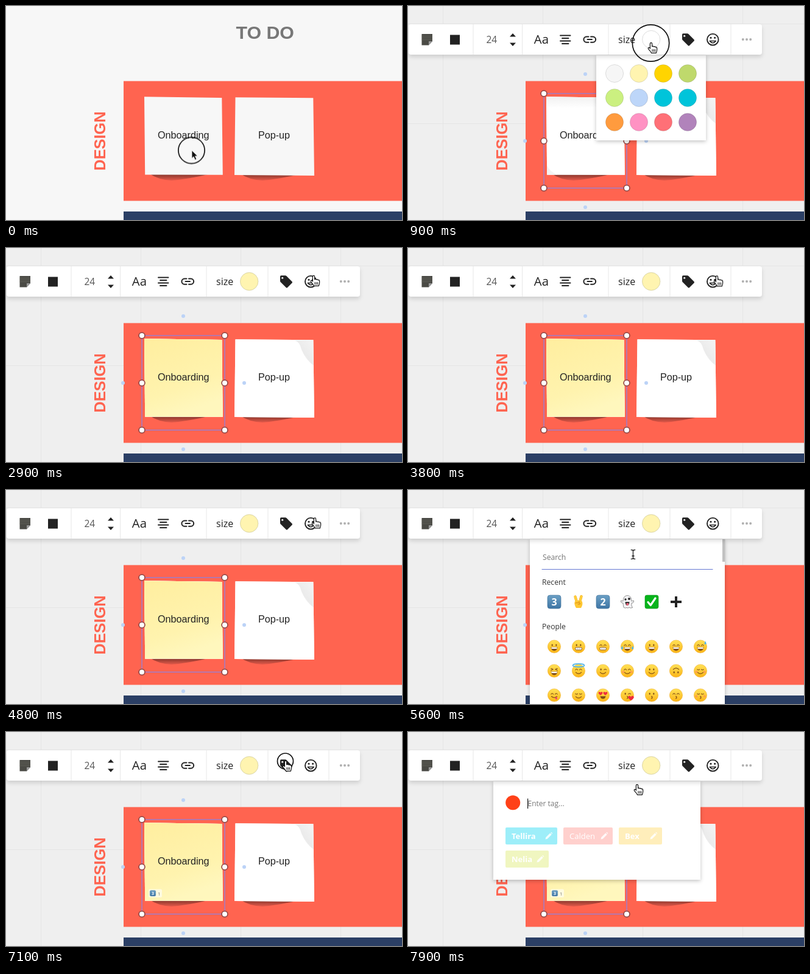
Recreate the animation shown at these times as an HTML page. Size 650 by 352 pixels, loop 8 s.

```html
<!DOCTYPE html>
<html lang="en">
<head>
<meta charset="utf-8">
<title>Task board</title>
<style>
html, body { margin: 0; width: 100%; height: 100%; overflow: hidden; background: #f7f7f7; }
svg { display: block; width: 650px; height: 352px; }
text { font-family: "Open Sans", sans-serif; }
.board { font-family: "Liberation Sans", Arial, sans-serif; }
.line { fill: none; stroke-linecap: round; stroke-linejoin: round; }
.drop { filter: drop-shadow(0 2px 3px rgba(0, 0, 0, .24)); }
.bar { filter: drop-shadow(0 4px 3px rgba(0, 0, 0, .13)); }
</style>
</head>
<body>
<svg id="stage" viewBox="0 0 650 352" xmlns="http://www.w3.org/2000/svg"></svg>
<script>
const LOOP = 8000, STEP = 100;
const INK = '#222', RED = '#ff6450', PALE = '#fff4b0';

const rect = (x, y, w, h, fill, more = '') => `<rect x="${x}" y="${y}" width="${w}" height="${h}" fill="${fill}" ${more}/>`;
const disc = (x, y, r, fill, more = '') => `<circle cx="${x}" cy="${y}" r="${r}" fill="${fill}" ${more}/>`;
const shape = (d, fill, more = '') => `<path d="${d}" fill="${fill}" ${more}/>`;
const line = (d, color, w = 1, more = '') => `<path class="line" d="${d}" stroke="${color}" stroke-width="${w}" ${more}/>`;
const text = (x, y, size, fill, str, more = '') => `<text x="${x}" y="${y}" font-size="${size}" fill="${fill}" ${more}>${str}</text>`;
const layer = (id, body) => `<g id="${id}">${body}</g>`;
const at = (x, y, body, k = 1) => `<g transform="translate(${x} ${y}) scale(${k})">${body}</g>`;

const defs = `<defs>
  <linearGradient id="yellow" x1="0" y1="0" x2=".35" y2="1"><stop stop-color="#ffee9f"/><stop offset=".7" stop-color="#fff3ae"/><stop offset="1" stop-color="#fff7bd"/></linearGradient>
  <linearGradient id="shade" x1="0" y1="0" x2="0" y2="1"><stop stop-color="#7f342a"/><stop offset="1" stop-color="#e4594a"/></linearGradient>
  <linearGradient id="peel" x1="1" y1="0" x2="0" y2="1"><stop stop-color="#f4f4f4"/><stop offset=".5" stop-color="#ebebeb"/><stop offset="1" stop-color="#fff"/></linearGradient>
  <linearGradient id="top" x1="0" y1="0" x2="0" y2="1"><stop stop-color="#f1f1f1"/><stop offset="1" stop-color="#fff"/></linearGradient>
  <linearGradient id="skin" x1="0" y1="0" x2="0" y2="1"><stop stop-color="#ffe257"/><stop offset="1" stop-color="#fbb416"/></linearGradient>
  <linearGradient id="key" x1="0" y1="0" x2="0" y2="1"><stop stop-color="#6b9fc4"/><stop offset="1" stop-color="#3f76a5"/></linearGradient>
</defs>`;

// Board
const grid = [57.5, 221.5, 385.5, 549.5].map(x => `M${x} 0V352`).join('') + 'M0 29.5H650M0 193.5H650';
const noteA = 'M227 149.3L354.3 151L355.8 277.8L228.2 277.5Z';
const noteB = 'M376.5 150.3L504.3 151.2L506 279L375 278Z';
const shadow = x => shape(`M${x} 276H${x + 100}Q${x + 62} 285 ${x + 36} 287Q${x + 14} 286 ${x} 276Z`, 'url(#shade)');
const board =
  text(377.5, 54, 30.3, '#777', 'TO DO', 'class="board" font-weight="700"') +
  rect(193, 123.5, 457, 197, RED) + rect(193, 338, 457, 14, '#2b3f65') +
  `<text class="board" transform="translate(162.8 222) rotate(-90)" text-anchor="middle" font-size="25.4" font-weight="700" fill="${RED}">DESIGN</text>` +
  shadow(236) + shadow(385);
const label = (x, str) => text(x, 217.6, 16.2, INK, str, 'class="board" text-anchor="middle"');

const whiteNotes =
  shape(noteA, '#fff') + shape('M227 149.3L354.3 151V160Q290 172 227.3 166Z', 'url(#top)') +
  shape('M228 262Q232 272 245 277.5H228.2Z', '#f3f3f3') +
  shape(noteB, '#fff') + shape('M474 152Q482 154 485 167Q492 184 504.7 193L504.3 151.2Z', 'url(#peel)');

const frameBox =
  rect(223, 144, 136, 155.5, 'none', 'stroke="#9080dc" stroke-width="1.3"') +
  [144, 222, 299.5].flatMap(y => [223, 359].map(x => disc(x, y, 4.9, '#fff', 'stroke="#964846" stroke-width="1.7"'))).join('') +
  [[291, 112], [192, 222], [391, 222], [291, 331]].map(([x, y]) => disc(x, y, 3, '#bcd3f7')).join('');

// Toolbar
const swatch = (x, y, c, edge = 'rgba(0,0,0,.12)') => disc(x, y, 14.6, c, `stroke="${edge}"`);
const toolbar =
  rect(1, 30, 580, 50, '#fff', 'rx="4" class="bar"') +
  line([107, 187.5, 329, 430, 530].map(x => `M${x} 30.5V79.5`).join(''), '#e7e7e7') +
  shape('M22.5 46H40V58L34 64.5H22.5Z', '#4a4a45') + line('M23 49.5H39.5M23 52.5H39.5M23 55.5H39.5', '#5f5f57') +
  shape('M34 64.5V58H40Z', '#999') +
  rect(69, 47.5, 16, 16, INK) +
  text(128.5, 60.5, 15.5, '#555', '24') +
  shape('M167 50.5L172 45L177 50.5ZM167 60.5L172 66L177 60.5Z', INK) +
  text(206.8, 62, 20.3, INK, 'Aa', 'font-weight="500"') +
  line('M250 48.5H266.5M253 53H263.5M250 57.5H266.5M253 62H263.5', INK, 1.9) +
  line('M296.5 50.5H293A4.6 4.6 0 0 0 293 59.7H296.5M300 50.5H303.5A4.6 4.6 0 0 1 303.5 59.7H300M294.5 55.1H302', INK, 2) +
  text(345, 61, 16, INK, 'size') +
  shape('M450 47Q450 45.3 451.7 45.3H458.5Q459.5 45.3 460.3 46L469.5 55.3Q470.6 56.5 469.5 57.6L462 65Q460.8 66 459.7 65L450.7 56Q450 55.2 450 54.3Z', INK) +
  disc(453.7, 49.2, 1.5, '#fff') +
  disc(500.3, 55.2, 9.3, 'none', `stroke="${INK}" stroke-width="1.9"`) +
  disc(497, 52.3, 1.5, INK) + disc(503.6, 52.3, 1.5, INK) + line('M495.3 57.5Q500.3 64 505.3 57.5Z', INK, 1.6) +
  [549.8, 556, 562.2].map(x => disc(x, 55, 2, '#b0b0b0')).join('') +
  swatch(399.2, 55, '#fff', '#ddd') + layer('chosen', swatch(399.2, 55, PALE, '#e0d9a4'));

// Colour palette
const colors = ['#f6f6f6', PALE, '#ffd400', '#bfd96c', '#cbf080', '#bdd6f9', '#00c4da', '#00c4da', '#ff9b3e', '#ff92c3', '#ff7077', '#b183bb'];
const palette = rect(309, 81, 180, 140, '#fff', 'class="drop"') +
  colors.map((c, i) => swatch(339 + i % 4 * 40, 111 + (i >> 2) * 40, c)).join('');

// Emoji, drawn around 0,0
const DARK = '#7a4a17';
const heart = (x, y, k) => at(x, y, shape('M0 3.2Q-6-1-3-3Q-1-4 0-1.6Q1-4 3-3Q6-1 0 3.2Z', '#ee2c3e'), k);
const both = f => f(-3.6) + f(3.6);
const eyes = {
  dot: both(x => `<ellipse cx="${x}" cy="-2.6" rx="1.2" ry="1.8" fill="${DARK}"/>`),
  arc: both(x => line(`M${x - 2}-1.6Q${x}-5 ${x + 2}-1.6`, DARK, 1.2)),
  shut: both(x => line(`M${x - 2}-2.6Q${x}-.6 ${x + 2}-2.6`, DARK, 1.2)),
  squint: line('M-5.6-4.4L-2-2.6L-5.6-1M5.6-4.4L2-2.6L5.6-1', DARK, 1.2),
  wink: `<ellipse cx="-3.6" cy="-2.6" rx="1.2" ry="1.8" fill="${DARK}"/>` + line('M2-2Q4-4 6-2', DARK, 1.2),
  heart: both(x => heart(x * 1.2, -2.8, .95))
};
const mouths = {
  open: shape('M-6 1.2H6Q5 7.6 0 7.6T-6 1.2Z', DARK) + rect(-5, 1.4, 10, 2.6, '#fff'),
  teeth: rect(-6, 1.5, 12, 4.6, '#fff', `rx="2.2" stroke="${DARK}" stroke-width=".9"`) + line('M-5.5 3.8H5.5M-2 2V6M2 2V6', '#aaa', .5),
  grin: shape('M-5 2H5Q4 6.6 0 6.6T-5 2Z', DARK),
  smile: line('M-5 2.5Q0 7.6 5 2.5', DARK, 1.2),
  kiss: line('M-.6 2Q2.6 2.6.2 4Q2.6 5 -.6 6', DARK, 1.1),
  tongue: line('M-5 2.2Q0 6.5 5 2.2', DARK, 1.2) + shape('M1 4.6Q3 9 5.2 7Q6 5 4.2 3Z', '#f0476d')
};
const blush = both(x => disc(x * 1.9, 1.8, 2, '#ff8a5c', 'opacity=".6"'));
const tear = (x, y) => shape(`M${x} ${y - 3}Q${x + 3} ${y + 2} ${x} ${y + 2.4}T${x} ${y - 3}Z`, '#4cb6ee');
const halo = '<ellipse cy="-9" rx="9.5" ry="2.6" fill="none" stroke="#53b5e8" stroke-width="1.7"/>';
const face = (e, m, extra = '', flip = 1) =>
  disc(0, 0, 10.6, 'url(#skin)', 'stroke="#eda21c" stroke-width=".5"') + at(0, 0, eyes[e] + mouths[m], .92 * flip) + extra;
const people = [
  ['dot', 'open'], ['dot', 'teeth'], ['arc', 'teeth'], ['arc', 'open', tear(-8.5, 2) + tear(8.5, 2)], ['dot', 'open'], ['arc', 'open'], ['arc', 'open', tear(8, -6)],
  ['squint', 'open'], ['arc', 'smile', halo], ['wink', 'smile'], ['arc', 'smile', blush], ['dot', 'smile'], ['dot', 'smile', '', -1], ['shut', 'smile', blush],
  ['arc', 'tongue'], ['shut', 'smile'], ['heart', 'grin'], ['wink', 'kiss', heart(6, 5, 1.2)], ['dot', 'kiss'], ['arc', 'kiss'], ['shut', 'kiss', blush]
];
const keycap = n => rect(-11, -11, 22, 22, 'url(#key)', 'rx="4" stroke="#3b6c96" stroke-width=".6"') +
  text(0, 5.8, 16, '#fff', n, 'text-anchor="middle" font-weight="700"');
const victory = line('M-3 0L-5.5-8.5M2 0L4.5-9', '#f0a81c', 4.4) + line('M-3 0L-5.5-8.5M2 0L4.5-9', '#ffcf3c', 3.4) +
  shape('M-6-1Q0-4 5.5-1Q8 3 4 10H-4Q-8 4-6-1Z', '#ffc732') + line('M-5 2Q0 0 3 3Q1 5-1 4M1-1V1.5', '#d98a14', 1);
const ghost = shape('M-6 9Q-7 4-7 2Q-11 2-10.5-2Q-9-2-7-1Q-7-10 0-10.5Q7-10 7-1Q9-2 10.5-2Q11 2 7 2Q6 6 8.5 9.5Q5 11 3 9Q1 11-1 9.5Q-4 11-6 9Z', '#f4f4f6', 'stroke="#777" stroke-width=".8"') +
  disc(-3, -4, 1.7, '#333') + disc(3, -5, 2.1, '#333') + shape('M-3.5 0H3.5Q3 6 0 6T-3.5 0Z', '#333') + shape('M-1.5 2H2V5Q0 7-1.5 5Z', '#f0637c');
const tick = rect(-11, -11, 22, 22, '#08b41c', 'rx="3" stroke="#078d17" stroke-width=".6"') + line('M-6 .5L-1.8 5.5L6-6', '#fff', 3.2);
const plus = shape('M-2-9H2V-2H9V2H2V9H-2V2H-9V-2H-2Z', INK);
const recent = [keycap(3), victory, keycap(2), ghost, tick, plus];

const emojiPanel =
  rect(200, 81, 320, 290, '#fff', 'class="drop"') + rect(516, 81, 4.5, 37, '#c1c1c1') +
  text(221, 115.3, 12.2, '#757575', 'Search') + line('M220 130.5H500', '#6477d2', 1.1) +
  layer('picked', rect(220, 164, 40, 40, '#efefef', 'rx="3"')) +
  text(220, 156, 12.2, '#333', 'Recent') + text(220, 229, 12.2, '#333', 'People') +
  recent.map((e, i) => at(240 + i * 40, 184, e)).join('') +
  people.map((p, i) => at(240 + i % 7 * 40, 257.5 + Math.floor(i / 7) * 40, face(...p))).join('') +
  layer('searchCaret', rect(221, 103, 1.2, 16, '#111'));

// Tag panel
const pencil = shape('M-5.5 5.5L-4.8 2.2L2.3-4.8L4.8-2.3L-2.2 4.8ZM3.2-5.6L4.4-6.2L6.2-4.4L5.6-3.2Z', '#fff', 'opacity=".85"');
const tag = ([x, y, w, fill, name, weight]) => rect(x, y, w, 28, fill, 'rx="2"') +
  text(x + 10, y + 18.7, 13, '#fff', name, `font-weight="${weight}"`) + at(x + w - 14, y + 14, pencil);
const tagPanel =
  rect(140, 81, 340, 162, '#fff', 'class="drop"') + disc(172.2, 116.3, 12, '#ff4118') +
  text(196.5, 122, 12, '#777', 'Enter tag...') +
  [[160, 157, 85, '#9deef9', 'Tellira', 700], [255, 157, 81, '#ffd0cd', 'Calden', 400],
   [346, 157, 71, '#ffeebb', 'Bex', 700], [160, 195, 71, '#f0f6c0', 'Nelia', 700]].map(tag).join('') +
  rect(196, 109.5, 1.2, 16.5, '#111');

// Pointer, hot spot at 0,0
const hand = shape('M-1.6 8V1.2Q-1.6-.6 0-.6T1.6 1.2V5.4Q3.2 4.4 4.6 6Q6.2 5 7.4 6.8Q9.4 6 9.6 8.4V11.5Q9.4 13.5 8.2 16.4H.6Q-.6 13.6-4.4 9.8Q-5.4 7.6-3.6 7.4Q-2.4 7.6-1.6 8.6Z', '#fff', 'stroke="#111" stroke-width="1.2"') +
  line('M2 10.5V14M4.3 10.5V14M6.6 10.5V14', '#111');
const arrow = shape('M0 0V13.2L3 10.4L5.3 15.6L7.8 14.5L5.5 9.4H9.6Z', '#111', 'stroke="#fff" stroke-width=".8"');
const beam = line('M-3-7.5Q0-7.5 0-5.5Q0-7.5 3-7.5M-3 7.5Q0 7.5 0 5.5Q0 7.5 3 7.5M0-6V6M-1.5 2.5H1.5', '#111', 1.3);
const pointer = disc(-.5, 0, 21.6, 'none', 'id="ring" stroke="#111" stroke-width="1.7"') +
  layer('arrow', arrow) + layer('hand', hand) + layer('beam', beam);

const badge = rect(234, 258.5, 22, 13.5, '#fffbe0', 'rx="2"') + at(241, 265.3, keycap(3), .43) + text(249, 268.5, 8, '#777', '1');

document.getElementById('stage').innerHTML = defs +
  rect(0, 0, 650, 352, '#f7f7f7') +
  layer('canvas', rect(0, 0, 650, 352, '#efefef') + line(grid, '#e5e5e5')) + board +
  shape(noteA + noteB, '#f7f7f7') + layer('white', whiteNotes) + layer('tinted', shape(noteA, 'url(#yellow)')) +
  label(291.3, 'Onboarding') + label(440, 'Pop-up') +
  layer('badge', badge) + layer('select', frameBox) +
  layer('palette', palette) + layer('emoji', emojiPanel) + layer('tags', tagPanel) +
  layer('toolbar', toolbar) + layer('pointer', pointer);

// Timeline: pointer stops and points passed at speed, as [ms, x, y]
const path = [
  [0, 305, 237.5], [200, 305, 237.5], [600, 399, 61], [1000, 399, 61], [1700, 384, 102], [2200, 384, 102],
  [2800, 505, 46], [2900, 505, 46], [3100, 507, 46.5], [5000, 507, 46.5],
  [5600, 369.5, 106], [5900, 240, 184], [6300, 240, 184], [6500, 318, 138], [6900, 459, 48], [7600, 459, 48],
  [7900, 376, 87], [8200, 200, 171]
];
const clicks = [-200, 600, 1900, 3100, 5900, 7000];
const shown = {
  canvas: [200], white: [200], select: [200], toolbar: [200],
  tinted: [2100], chosen: [2100], badge: [6200], picked: [5900],
  palette: [900, 2300], emoji: [5000, 6600], tags: [7500]
};
const during = (t, id) => t >= shown[id][0] && t < (shown[id][1] || LOOP);

// Zero where the pointer rests, otherwise the mean speed across the point
function speed(i, k) {
  const a = path[i - 1], p = path[i], b = path[i + 1];
  if (!a || !b || a[k] === p[k] || b[k] === p[k]) return 0;
  return (b[k] - a[k]) / (b[0] - a[0]);
}
function place(t) {
  const i = Math.max(1, path.findIndex(p => p[0] >= t));
  const p = path[i - 1], q = path[i], d = q[0] - p[0], u = (t - p[0]) / d;
  const ease = u * u * (3 - 2 * u);
  return [1, 2].map(k => p[k] + (q[k] - p[k]) * ease +
    d * u * (1 - u) * (speed(i - 1, k) * (1 - u) - speed(i, k) * u));
}
function kind(t) {
  const y = place(t)[1];
  if (y > 30 && y < 81 || during(t, 'palette') || during(t, 'tags')) return 'hand';
  if (during(t, 'emoji')) return y < 130 ? 'beam' : y > 164 ? 'hand' : 'arrow';
  return 'arrow';
}
function ring(t) {
  const age = clicks.map(c => t - c).find(a => a >= 0 && a < 400);
  return age === undefined ? { r: '0px', opacity: 0 } : { r: `${4.4 + age * .086}px`, opacity: 1 };
}

function play(id, state) {
  const n = LOOP / STEP;
  const frames = Array.from({ length: n + 1 }, (_, i) =>
    ({ ...state(Math.min(i, n - 1) * STEP), offset: i / n, easing: 'step-end' }));
  document.getElementById(id).animate(frames, { duration: LOOP, iterations: Infinity });
}
const show = on => ({ opacity: on ? 1 : 0 });
for (const id in shown) play(id, t => show(during(t, id)));
for (const id of ['arrow', 'hand', 'beam']) play(id, t => show(kind(t) === id));
play('searchCaret', t => show(Math.floor((t - 5100) / 500) % 2 === 0));
play('ring', ring);
play('pointer', t => {
  const [x, y] = place(t);
  return { transform: `translate(${x}px, ${y}px)` };
});
</script>
</body>
</html>
```
